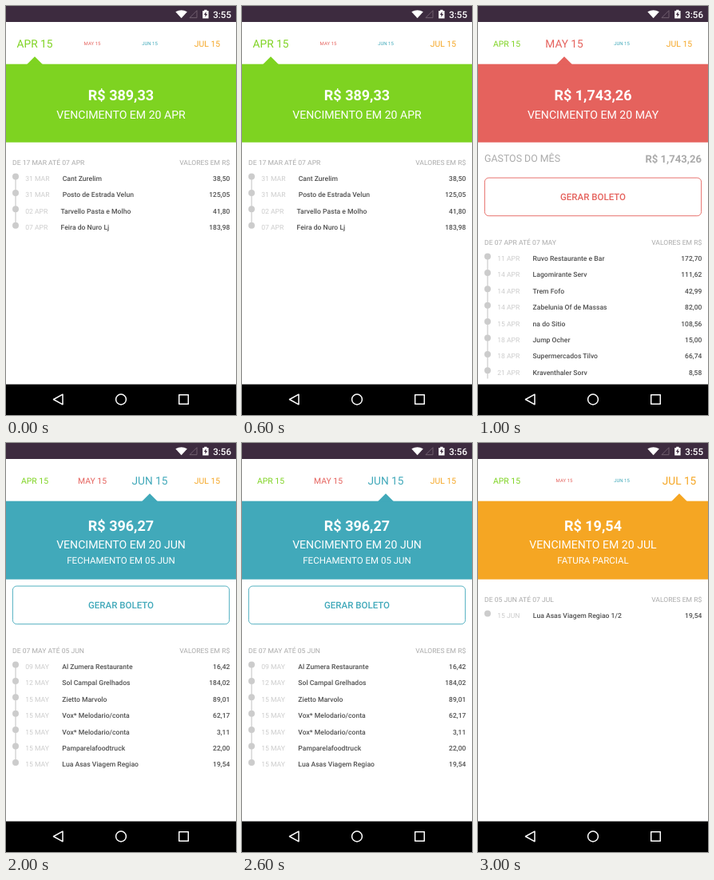
Recreate the animation shown at these times as an HTML page. Size 288 px wide and 512 px high, loop 4000 ms.

```html
<!DOCTYPE html>
<html lang="pt">
<head>
<meta charset="utf-8">
<title>Faturas</title>
<style>
html, body { margin: 0; width: 100%; height: 100%; overflow: hidden; background: #fff; }
svg { display: block; width: 100vw; height: 100vh; font-family: Roboto, Arial, sans-serif; text-rendering: geometricPrecision; }
.screen { opacity: 0; animation: show 4s step-end infinite; }
@keyframes show {
  0% { opacity: 1; }
  25%, 100% { opacity: 0; }
}
</style>
</head>
<body>
<svg id="stage" viewBox="0 0 288 512" xmlns="http://www.w3.org/2000/svg"></svg>
<script>
const MONTHS = ['APR', 'MAY', 'JUN', 'JUL'];
const COLORS = ['#7ed321', '#e5625d', '#41a9ba', '#f5a623'];
const TAB_SIZE = { s: 6, m: 10.4, l: 13.7 };
const NAME_X = { MAR: 70.7, APR: 68.6, MAY: 70.3, JUN: 68.8 };
const BAR = '#3d2b3f', GRAY = '#aaa', LIGHT = '#ccc', DARK = '#505050';
const ROW = 20.4, RIGHT = 280.3;

const screens = [
  {
    clock: '3:55', tabs: 'lssm',
    total: 'R$ 389,33', due: 'VENCIMENTO EM 20 APR',
    period: 'DE 17 MAR ATÉ 07 APR', listY: 196,
    rows: [
      ['31 MAR', 'Cant Zurelim', '38,50'],
      ['31 MAR', 'Posto de Estrada Velun', '125,05'],
      ['02 APR', 'Tarvello Pasta e Molho', '41,80'],
      ['07 APR', 'Feira do Nuro Lj', '183,98']
    ]
  },
  {
    clock: '3:56', tabs: 'mlsm',
    total: 'R$ 1,743,26', due: 'VENCIMENTO EM 20 MAY',
    spent: true, buttonY: 215.1,
    period: 'DE 07 APR ATÉ 07 MAY', listY: 296, more: true,
    rows: [
      ['11 APR', 'Ruvo Restaurante e Bar', '172,70'],
      ['14 APR', 'Lagomirante Serv', '111,62'],
      ['14 APR', 'Trem Fofo', '42,99'],
      ['14 APR', 'Zabelunia Of de Massas', '82,00'],
      ['15 APR', 'na do Sitio', '108,56'],
      ['18 APR', 'Jump Ocher', '15,00'],
      ['18 APR', 'Supermercados Tilvo', '66,74'],
      ['21 APR', 'Kraventhaler Sorv', '8,58']
    ]
  },
  {
    clock: '3:56', tabs: 'mmlm',
    total: 'R$ 396,27', due: 'VENCIMENTO EM 20 JUN', note: 'FECHAMENTO EM 05 JUN',
    buttonY: 179.1,
    period: 'DE 07 MAY ATÉ 05 JUN', listY: 260,
    rows: [
      ['09 MAY', 'Al Zumera Restaurante', '16,42'],
      ['12 MAY', 'Sol Campal Grelhados', '184,02'],
      ['15 MAY', 'Zietto Marvolo', '89,01'],
      ['15 MAY', 'Vox* Melodario/conta', '62,17'],
      ['15 MAY', 'Vox* Melodario/conta', '3,11'],
      ['15 MAY', 'Pamparelafoodtruck', '22,00'],
      ['15 MAY', 'Lua Asas Viagem Regiao', '19,54']
    ]
  },
  {
    clock: '3:55', tabs: 'mssl',
    total: 'R$ 19,54', due: 'VENCIMENTO EM 20 JUL', note: 'FATURA PARCIAL',
    period: 'DE 05 JUN ATÉ 07 JUL', listY: 196,
    rows: [['15 JUN', 'Lua Asas Viagem Regiao 1/2', '19,54']]
  }
];

// y is the middle of the capitals
function text(str, x, y, size, fill, anchor = 'start', weight = 400) {
  return `<text x="${x}" y="${(y + size * 0.356).toFixed(2)}" font-size="${size}" fill="${fill}"
    text-anchor="${anchor}" font-weight="${weight}">${str}</text>`;
}

const rect = (x, y, w, h, fill) =>
  `<rect x="${x}" y="${y}" width="${w}" height="${h}" fill="${fill}"/>`;

function statusBar(s) {
  return rect(0, 0, 288, 20, BAR)
    + '<path d="M219.6 15.2l-7.3 -8q7.3 -4 14.6 0z" fill="#fff"/>'
    + '<path d="M239 5.7v9h-9z" fill="none" stroke="#766574" stroke-width="0.9"/>'
    + '<path d="M246.2 6h2v-1.2h3.4v1.2h2v9.6h-7.4z" fill="#fff"/>'
    + `<path d="M250.5 7l-2.6 3.9h1.6v3.2l2.6 -4h-1.6z" fill="${BAR}"/>`
    + text(s.clock, 282, 10.5, 11.6, '#fff', 'end', 500);
}

function tabs(s) {
  return MONTHS.map((m, i) =>
    text(m + ' 15', 36 + 72 * i, 46.8, TAB_SIZE[s.tabs[i]], COLORS[i], 'middle')).join('');
}

function banner(s, i) {
  const x = 36 + 72 * i, top = s.note ? 103.2 : 111.8;
  return rect(0, 72.7, 288, 98, COLORS[i])
    + `<path d="M${x - 10} 73.2l10 -10 10 10z" fill="${COLORS[i]}"/>`
    + text(s.total, 144, top, 18, '#fff', 'middle', 700)
    + text(s.due, 144, top + 24, 14.1, '#fff', 'middle')
    + (s.note ? text(s.note, 144, 146.8, 11.5, '#fff', 'middle') : '');
}

function button(y, color) {
  return `<rect x="8.4" y="${y}" width="271.2" height="47.6" rx="5" fill="none" stroke="${color}" stroke-width="0.9"/>`
    + text('GERAR BOLETO', 144, y + 24.1, 11.5, color, 'middle', 500);
}

function list(s) {
  const first = s.listY + 20, last = first + ROW * (s.rows.length - 1);
  const end = last - 2.5 + (s.more ? ROW / 2 : 0);
  const line = `<path d="M12 ${first - 2.5}V${end}" stroke="${LIGHT}" stroke-width="1.2"/>`;
  const rows = s.rows.map(([date, name, value], i) => {
    const y = first + ROW * i;
    return `<circle cx="12" cy="${y - 2.5}" r="4" fill="${LIGHT}"/>`
      + text(date, 24.2, y, 8.6, LIGHT)
      + text(name, NAME_X[date.slice(3)], y, 8.6, DARK, 'start', 500)
      + text(value, RIGHT, y, 8.5, DARK, 'end', 500);
  });
  return text(s.period, 8, s.listY, 8.6, GRAY)
    + text('VALORES EM R$', RIGHT, s.listY, 8.6, GRAY, 'end')
    + line + rows.join('');
}

function screen(s, i) {
  const spent = s.spent
    ? text('GASTOS DO MÊS', 8, 191, 12.4, GRAY) + text('R$ 1,743,26', 280, 191, 13.1, GRAY, 'end', 700)
    : '';
  return `<g class="screen" style="animation-delay:${i - 4}s">`
    + statusBar(s) + tabs(s) + banner(s, i) + spent
    + (s.buttonY ? button(s.buttonY, COLORS[i]) : '')
    + list(s) + '</g>';
}

const navBar = rect(0, 473.6, 288, 39, '#000')
  + `<g fill="none" stroke="#fff" stroke-width="1.5" stroke-linejoin="round">
    <path d="M59.5 492.5L71 486.2v12.6z"/>
    <circle cx="144" cy="492.5" r="6.4"/>
    <rect x="216.7" y="486.7" width="11.6" height="11.6"/></g>`;

document.getElementById('stage').innerHTML =
  rect(0, 0, 288, 512, '#fff') + screens.map(screen).join('') + navBar;
</script>
</body>
</html>
```
